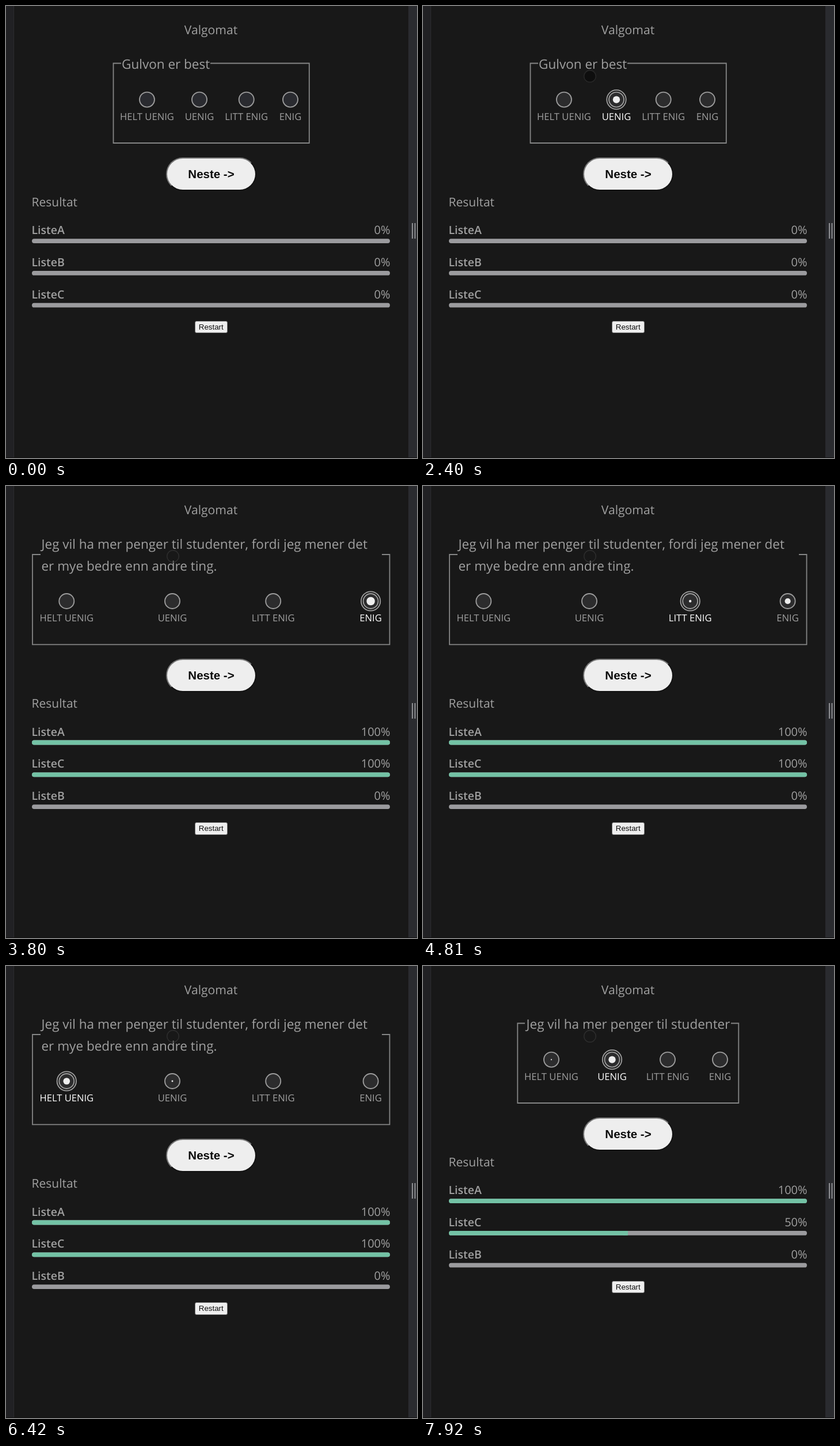
Recreate the animation shown at these times as an HTML page. Size 714 by 785 pixels, loop 8000 ms.

```html
<!DOCTYPE html>
<html lang="no">
<head>
<meta charset="utf-8">
<title>Valgomat</title>
<style>
html, body { margin: 0; width: 100%; height: 100%; overflow: hidden; background: #181818; }
.btn { position: absolute; box-sizing: border-box; background: #eee; color: #0c0c0c; text-align: center;
  font-family: "Liberation Sans", Arial, sans-serif; }
#next { left: 278px; width: 157px; height: 58px; border: 2px solid; border-color: #767676 #121212 #121212 #767676;
  border-radius: 29px; font-size: 20.5px; font-weight: bold; line-height: 53px; }
#restart { left: 327.5px; width: 57.5px; height: 21.5px; border: 1px solid #767676; border-radius: 3px;
  font-size: 13.33px; line-height: 20px; }
svg { position: absolute; left: 0; top: 0; font-family: "Open Sans", "Noto Sans", sans-serif; fill: #a0a0a0;
  text-rendering: geometricPrecision; }
</style>
</head>
<body>
<div class="btn" id="next">Neste -&gt;</div>
<div class="btn" id="restart">Restart</div>
<svg id="view" width="714" height="785"></svg>
<script>
const DURATION = 8000, STEP = 100.5;
const OPTIONS = ['HELT UENIG', 'UENIG', 'LITT ENIG', 'ENIG'];
const $ = id => document.getElementById(id);

// box: left, right, top; gap: where the legend interrupts the top border
const QUESTIONS = [
  { at: 0, lines: ['Gulvon er best'], x: 201, box: [186.5, 526.8, 99.5], gap: [200, 355],
    radios: [245, 336, 417.7, 494], shift: 0, result: [['A', 0], ['B', 0], ['C', 0]] },
  { at: 3800, lines: ['Jeg vil ha mer penger til studenter, fordi jeg mener det', 'er mye bedre enn andre ting.'],
    x: 61.5, box: [46, 666.5, 119], gap: [60, 653],
    radios: [105.3, 289, 464.2, 633.6], shift: 37.4, result: [['A', 100], ['C', 100], ['B', 0]] },
  { at: 6910, lines: ['Jeg vil ha mer penger til studenter'], x: 179.5, box: [164.3, 548.3, 99.5], gap: [177, 535],
    radios: [223, 328.5, 425, 516], shift: 0, result: [['A', 100], ['C', 50], ['B', 0]] }
];

// time, chosen option, size of the dot in the first step (0: focus only)
const CHOICES = [[1800, 0, 0], [2400, 1, .85], [2700, 2, .3], [3010, 3, .3],
  [4810, 2, .3], [5210, 1, .3], [6220, 0, .3], [7820, 1, .85]];

const PATH = [[400, 250], [350, 202], [292, 166], [252, 140], [241, 118], [256, 100], [283, 93], [289, 108], [290, 122]];

const text = (x, y, size, str, attrs = '') => `<text x="${x}" y="${y}" font-size="${size}" ${attrs}>${str}</text>`;
const circle = (x, y, r, fill, stroke = 'none', width = 2) =>
  `<circle cx="${x}" cy="${y}" r="${r}" fill="${fill}" stroke="${stroke}" stroke-width="${width}"/>`;
const rect = (x, y, w, h, fill, r = 0) => `<rect x="${x}" y="${y}" width="${w}" height="${h}" rx="${r}" fill="${fill}"/>`;
const lastBefore = (list, t, time) => list.filter(e => time(e) <= t).pop();

function frame() {
  return rect(0, 0, 13, 785, '#212124') + rect(13, 0, 1, 785, '#2b2b2e') +
    rect(699, 0, 15, 785, '#2a2b2f') + rect(0, 784, 714, 1, '#111') +
    rect(705, 377, 2, 27, '#8e8f93') + rect(709.5, 377, 2, 27, '#8e8f93') +
    text(356, 49, 21.1, 'Valgomat', 'text-anchor="middle"');
}

function fieldset(q) {
  const [left, right, top] = q.box, bottom = 238 + q.shift;
  return `<path d="M${q.gap[0]} ${top}H${left}V${bottom}H${right}V${top}H${q.gap[1]}" fill="none" stroke="#858686" stroke-width="1.8"/>` +
    q.lines.map((line, i) => text(q.x, 109 + 37.5 * i, 22.5, line)).join('');
}

function radios(q, t) {
  const choice = lastBefore(CHOICES, t, c => c[0]);
  const prev = CHOICES[CHOICES.indexOf(choice) - 1];
  const grow = choice && choice[2] ? Math.min(1, choice[2] + .5 * Math.floor((t - choice[0]) / STEP)) : 0;
  const y = 162.6 + q.shift;
  return q.radios.map((x, i) => {
    const focused = choice && choice[1] === i;
    const dot = focused ? grow : prev && prev[2] && prev[1] === i ? 1 - grow : 0;
    return (focused ? circle(x, y, 16.7, 'none', '#a0a0a0', 1.8) : '') +
      circle(x, y, 13, t < 2400 ? '#2a2b30' : '#2c2c2d', '#9c9c9c', 1.9) +
      (dot > 0 ? circle(x, y, 7.3 * dot, '#eee') : '') +
      text(x, 197.5 + q.shift, 16.6, OPTIONS[i], `text-anchor="middle" ${focused && grow ? 'fill="#fff"' : ''}`);
  }).join('');
}

function results(q) {
  return text(44.5, 348 + q.shift, 21, 'Resultat') + q.result.map(([name, percent], i) => {
    const y = 404.2 + q.shift + 55.8 * i, end = 45 + 6.22 * percent;
    return text(44.5, y - 8, 19.5, 'Liste' + name, 'font-weight="600"') +
      text(667.5, y - 8, 20, percent + '%', 'text-anchor="end"') +
      rect(45, y, 622, 7.8, '#9b9b9e', 3.9) +
      (percent ? rect(45, y, end - 45, 7.8, '#73c2a5', 3.9) : '') +
      (percent && percent < 100 ? rect(end - 8, y, 8, 7.8, '#73c2a5') : '');
  }).join('');
}

function cursor(t) {
  if (t < 190) return '';
  const pos = t < 290 ? [443, 317] : t < 480 ? [433, 296] : PATH[Math.min(8, Math.floor((t - 480) / 100))];
  return circle(...pos, 10.3, t < 3800 ? 'rgba(0,0,0,.4)' : 'none', t < 3800 ? '#292929' : '#2e2e2e', 1.4);
}

function draw(now) {
  const t = now % DURATION;
  const q = lastBefore(QUESTIONS, t, e => e.at);
  $('next').style.top = 262.5 + q.shift + 'px';
  $('restart').style.top = 546.8 + q.shift + 'px';
  $('view').innerHTML = frame() + fieldset(q) + radios(q, t) + results(q) + cursor(t);
}

let start;
function tick(now) {
  start ??= now;
  draw(now - start);
  requestAnimationFrame(tick);
}
draw(0);
requestAnimationFrame(tick);
</script>
</body>
</html>
```
